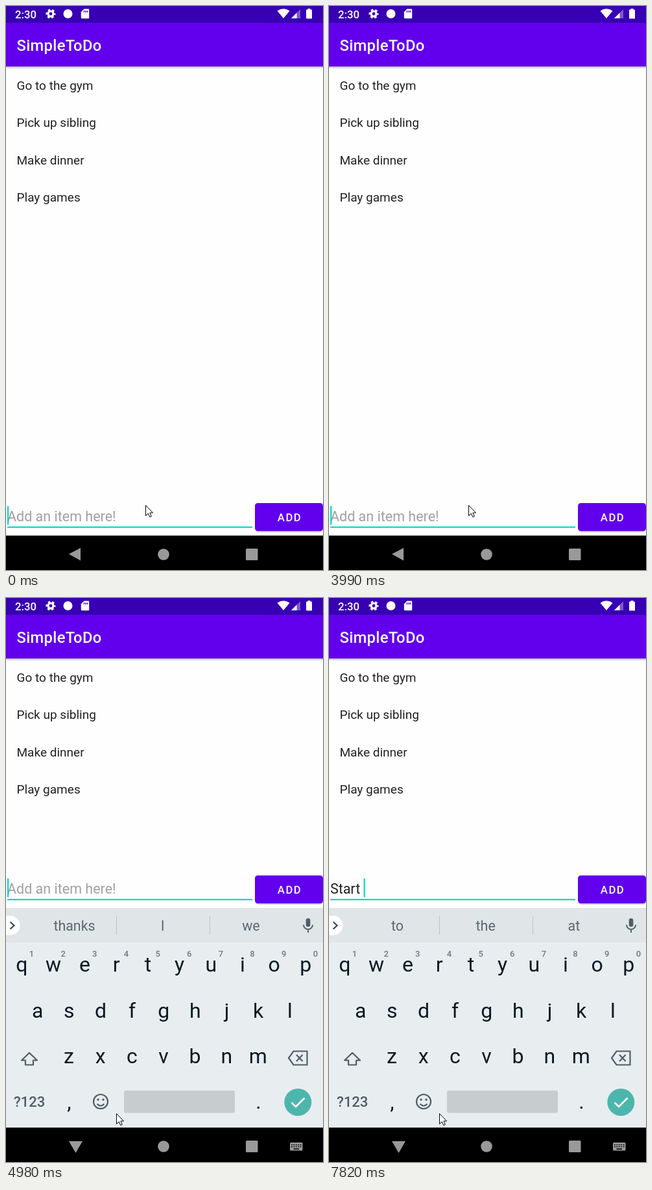
These frames come from a looping animation (489x868 px, 8 s). An HTML page:

```html
<!DOCTYPE html>
<html lang="en">
<head>
<meta charset="utf-8">
<title>To-do list</title>
<style>
  html, body { margin: 0; width: 100%; height: 100%; overflow: hidden; background: #fefefe; }
  svg { display: block; }
  text { font-family: Roboto, sans-serif; white-space: pre; }
  .medium { font-weight: 500; }
  .mid { text-anchor: middle; }
  .line { fill: none; stroke: #4f5d65; stroke-width: 2.2; }
</style>
</head>
<body>
<svg width="489" height="868" viewBox="0 0 489 868">
  <defs>
    <linearGradient id="shade" x2="0" y2="1">
      <stop stop-color="#000" stop-opacity=".28"/>
      <stop offset="1" stop-color="#000" stop-opacity="0"/>
    </linearGradient>
  </defs>
  <rect width="489" height="868" fill="#fefefe"/>

  <!-- status bar and title -->
  <rect y="93" width="489" height="4" fill="url(#shade)"/>
  <rect width="489" height="93" fill="#6200ee"/>
  <rect width="489" height="26" fill="#3700b3"/>
  <g fill="#fff">
    <text class="medium" x="14" y="18.5" font-size="16.7">2:30</text>
    <g fill="none" stroke="#fff">
      <circle cx="69" cy="12" r="4" stroke-width="3.2"/>
      <circle cx="69" cy="12" r="6.2" stroke-width="2.6" stroke-dasharray="3.4 3.09" stroke-dashoffset="1.7"/>
    </g>
    <circle cx="95.500" cy="12" r="7"/>
    <path d="M120.500 4.500H127q1.200 0 1.200 1.200V18q0 1.200 -1.200 1.200H117q-1.200 0 -1.200 -1.200V9.200Z"/>
    <path d="M120.500 7v3M123 7v3M125.500 7v3" stroke="#3700b3" stroke-width="1.300"/>
    <path d="M418.500 7.500Q428 1 437.500 7.500L428 19Z"/>
    <path d="M440 19L454 5V19Z" opacity=".35"/>
    <path d="M440 19L448.500 10.500V19Z"/>
    <path d="M465.500 5.500V4H469.500V5.500H471q1 0 1 1V18.500q0 1 -1 1H464q-1 0 -1 -1V6.500q0 -1 1 -1Z"/>
    <text class="medium" x="16.500" y="69" font-size="23.8" letter-spacing=".3">SimpleToDo</text>
  </g>
  <g id="list" font-size="19.04" fill="#212121"></g>

  <!-- entry row -->
  <g id="entry">
    <rect x="2" y="801" width="378" height="2.2" fill="#0bd8c6"/>
    <text id="hint" x="2" y="792.500" font-size="21.5">Add an item here!</text>
    <text id="typed" x="2" y="792.500" font-size="21.42" fill="#212121"></text>
    <rect id="composing" x="2" y="795" height="1.2" fill="#212121"/>
    <rect id="caret" y="769.500" width="2.2" height="29" fill="#03dac5"/>
    <rect x="384.500" y="766" width="104.500" height="44" rx="5" fill="#000" opacity=".18"/>
    <rect x="384" y="765" width="105" height="43" rx="4.5" fill="#6200ee"/>
    <text class="medium mid" x="437.500" y="793" font-size="16.7" letter-spacing="1.5" fill="#fff">ADD</text>
  </g>

  <!-- navigation bar -->
  <rect y="815" width="489" height="53" fill="#000"/>
  <g fill="#999">
    <path id="back"/>
    <circle cx="243" cy="844" r="8.800"/>
    <rect x="370" y="835" width="18.500" height="18" rx="1.5"/>
    <g id="imeIcon">
      <rect x="438" y="838" width="19.500" height="12.500" rx="1.5"/>
      <path d="M440 841.500H456M440 844.500H456" stroke="#000" stroke-width="1.5" stroke-dasharray="1.8 1.6"/>
      <path d="M443.500 848H452" stroke="#000" stroke-width="1.5"/>
    </g>
  </g>

  <!-- keyboard -->
  <g id="keyboard">
    <rect y="477" width="489" height="338" fill="#e8edf0"/>
    <rect y="477" width="489" height="53" fill="#e0e5e8"/>
    <path d="M170.500 489V518M314.500 489V518" stroke="#bcc4c8"/>
    <path d="M0 489H6.500a15 15 0 0 1 0 30H0Z" fill="#fff"/>
    <path d="M6.500 498.500L12.500 504L6.500 509.500" class="line" style="stroke:#37474f"/>
    <rect x="462.700" y="493" width="6.600" height="13" rx="3.300" fill="#4f5d65"/>
    <path d="M459 503a7 7 0 0 0 14 0M466 510V515" class="line" style="stroke-width:1.9"/>
    <g id="words" class="mid" font-size="21.42" fill="#5b686f"></g>
    <g id="keys" class="mid" font-size="32" fill="#0a1a22"></g>
    <g id="digits" class="mid medium" font-size="13" fill="#6d797f"></g>
    <path d="M36 700L48 711.500H42V718.500H30V711.500H24Z" class="line" stroke-linejoin="round"/>
    <path d="M443.500 697.500H464.500V718.500H443.500L436 708ZM448 703L457.500 713M457.500 703L448 713" class="line"/>
    <text x="12" y="783" font-size="22" fill="#4f5d65" class="medium">?123</text>
    <circle cx="146" cy="775" r="11" class="line"/>
    <path d="M140.500 778.500Q146 784.500 151.500 778.500" class="line"/>
    <g fill="#4f5d65"><circle cx="142" cy="772" r="1.700"/><circle cx="150" cy="772" r="1.700"/></g>
    <rect x="182" y="758" width="171" height="34.500" rx="3" fill="#c8ccce"/>
    <circle cx="450.300" cy="776" r="21" fill="#4db6ac"/>
    <path d="M440.500 776.500L447 783L460.500 769.500" fill="none" stroke="#fff" stroke-width="2.6"/>
  </g>

  <path id="pointer" d="M.5 .5V16.500L4.300 13L6.800 18.500L9.300 17.400L6.900 12H11.500Z" fill="#fff" stroke="#000"/>
</svg>
<script>
const $ = id => document.getElementById(id);
const label = (x, y, s) => `<text x="${x}" y="${y}">${s}</text>`;
const row = (chars, x, y) => [...chars].map((c, i) => label(x + i * 48.65, y, c)).join('');
const show = (id, on) => $(id).style.display = on ? '' : 'none';

$('list').innerHTML = ['Go to the gym', 'Pick up sibling', 'Make dinner', 'Play games']
  .map((s, i) => label(16.5, 129 + i * 57.4, s)).join('');
$('keys').innerHTML = row('qwertyuiop', 24.3, 575) + row('asdfghjkl', 48.6, 645.5) +
  row('zxcvbnm', 97, 716) + label(97.5, 786, ',') + label(389.5, 786, '.');
$('digits').innerHTML = row('1234567890', 39.5, 552);

const LOOP = 8000, PRESS = 4670, OPEN = 4820, SETTLED = 4980;
const caretFlips = [600, 1050, 1580, 1980, 2570, 2970, 3590, 3990, 4520, 4980, 5570, 5880, 7230, 7660];
// time, entered text, three suggestions
const typing = [
  [0, '', 'thanks', 'I', 'we'],
  [5880, 'S', 'S', 'So', 'Sorry'],
  [6020, 'St', 'St', 'Still', 'Stop'],
  [6300, 'Sta', 'Sta', 'Stay', 'Start'],
  [6420, 'Star', 'Star', 'Start', 'Stars'],
  [6700, 'Start', 'Start', 'Started', 'Starting'],
  [7820, 'Start ', 'to', 'the', 'at']
];
const moves = [[0, 215, 768], [4520, 176, 790], [PRESS, 170, 792], [SETTLED, 170, 793]];
const latest = (steps, t) => steps.filter(s => s[0] <= t).pop();

function draw() {
  const t = performance.now() % LOOP;
  const open = t >= OPEN, sliding = open && t < SETTLED;
  const [, entered, ...words] = latest(typing, t);
  const [, px, py] = latest(moves, t);

  $('entry').setAttribute('transform', `translate(0 ${open ? -338 : 0})`);
  show('hint', !entered);
  $('hint').setAttribute('fill', t >= PRESS && !open ? '#707070' : '#a0a0a0');
  $('typed').textContent = entered;
  const width = entered ? $('typed').getComputedTextLength() : 0;
  $('composing').setAttribute('width', entered.endsWith(' ') ? 0 : width);
  $('caret').setAttribute('x', 2 + width);
  show('caret', caretFlips.filter(f => f <= t).length % 2 === 0);

  show('keyboard', open);
  show('imeIcon', open);
  $('keyboard').setAttribute('transform', `translate(0 ${sliding ? 5.8 : 0})`);
  $('keyboard').setAttribute('opacity', sliding ? 0.9 : 1);
  $('words').innerHTML = words.map((w, i) => label(105.5 + i * 136.2, 512, w)).join('');
  $('back').setAttribute('d', open ? 'M97 836H118L107.5 854Z' : 'M97 843.5L115 834V853.5Z');
  $('pointer').setAttribute('transform', `translate(${px} ${py})`);
  requestAnimationFrame(draw);
}
draw();
</script>
</body>
</html>
```
